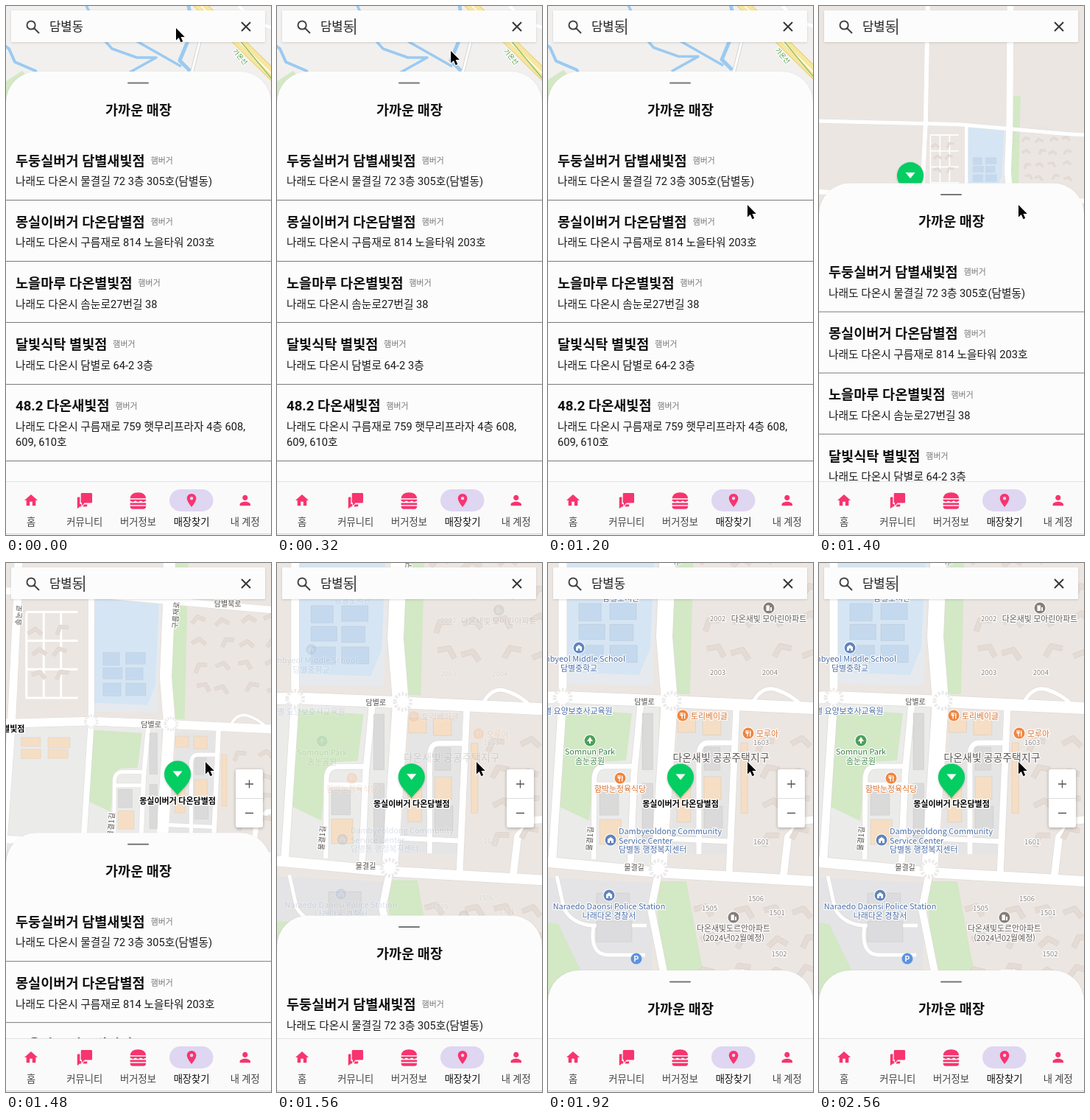
Animation, 360 px wide and 718 px high, one loop 2.6 s. Source, as an HTML page with a canvas:

```html
<!DOCTYPE html>
<html lang="ko">
<head>
<meta charset="utf-8">
<title>매장찾기</title>
<style>
  html, body { margin: 0; width: 100%; height: 100%; overflow: hidden; background: #fafafa; }
  canvas { display: block; width: 360px; height: 718px; }
</style>
</head>
<body>
<canvas id="stage" width="360" height="718"></canvas>
<script>
const LOOP = 2600;
const CENTER = { x: 180, y: 322 };
const PAN = { x: -485, y: 43 };
const ZOOM_STEPS = 3;
const SANS = 'Roboto, "Noto Sans CJK KR", "Noto Sans CJK", sans-serif';
const MAP_SANS = '"Noto Sans CJK KR", "Noto Sans CJK", "Noto Sans", sans-serif';
const PINK = '#f8346f';
const ctx = document.getElementById('stage').getContext('2d');

const clamp = v => Math.min(1, Math.max(0, v));
const mix = (a, b, k) => a + (b - a) * k;
const ease = (t, from, to) => 0.5 - 0.5 * Math.cos(Math.PI * clamp((t - from) / (to - from)));

function seeded(seed) {
  return () => (seed = (seed * 16807) % 2147483647) / 2147483647;
}

function fill(path, color) {
  ctx.fillStyle = color;
  ctx.fill(new Path2D(path));
}

function line(path, color, width) {
  ctx.strokeStyle = color;
  ctx.lineWidth = width;
  ctx.stroke(new Path2D(path));
}

function disc(x, y, r, color) {
  ctx.fillStyle = color;
  ctx.beginPath();
  ctx.arc(x, y, r, 0, 7);
  ctx.fill();
}

function box(x, y, w, h, r, color) {
  ctx.fillStyle = color;
  ctx.beginPath();
  ctx.roundRect(x, y, w, h, r);
  ctx.fill();
}

function at(x, y, draw, angle = 0) {
  ctx.save();
  ctx.translate(x, y);
  ctx.rotate(angle);
  draw();
  ctx.restore();
}

function shadowed(blur, alpha, draw) {
  ctx.save();
  ctx.shadowColor = `rgba(0,0,0,${alpha})`;
  ctx.shadowBlur = blur;
  ctx.shadowOffsetY = 1;
  draw();
  ctx.restore();
}

function text(str, x, y, size, { color = '#111', weight = 400, align = 'left', family = SANS, halo = 0 } = {}) {
  ctx.font = `${weight} ${size}px ${family}`;
  ctx.textAlign = align;
  const base = y + size * 0.35;
  if (halo) {
    ctx.strokeStyle = '#fff';
    ctx.lineWidth = halo;
    ctx.strokeText(str, x, base);
  }
  ctx.fillStyle = color;
  ctx.fillText(str, x, base);
  return ctx.measureText(str).width;
}

const mapText = (str, x, y, size, color, align = 'center') =>
  text(str, x, y, size, { color, align, family: MAP_SANS, halo: 2.5 });

// ---- map ----

function cameraAt(t) {
  const left = 1 - ease(t, 1188, 1580);
  return {
    scale: 2 ** (-ZOOM_STEPS * left),
    x: CENTER.x + PAN.x * left,
    y: CENTER.y + PAN.y * left
  };
}

const project = (cam, x, y) => [
  (x - cam.x) * cam.scale + CENTER.x,
  (y - cam.y) * cam.scale + CENTER.y
];

function drawOverview() {
  fill('M-200-200H600V900H-200Z', '#f1f0ee');
  fill('M-60 110L0 102 22 88 60 130 40 260-60 280Z', '#d5e8c6');
  const water = '#9bcaf1';
  line('M-20 40L4 58 12 76 40 88 58 120', water, 4);
  line('M100-20L128 40 144 58 178 70 204 70 168 90M178 48L238 82', water, 3.5);
  line('M244-20L250 10 246 50 236 74 250 88', water, 5);
  line('M60 200L210 290 400 340M220 100L238 320 220 500M300-20L335 22 400 40', '#fff', 4);
  const railway = 'M270-30L264 45 252 92 246 180';
  line(railway, '#d6d6d6', 5);
  line(railway, '#fff', 3);
  const motorway = 'M250-14L312 44 440 170';
  line(motorway, '#e8cf78', 15);
  line(motorway, '#f8e6a0', 13);
  line(motorway, '#fff', 1.5);
  line('M285 10L322 52 362 100', '#8fc46b', 1.5);
  at(318, 69, () => mapText('가온선', 0, 0, 9, '#4d9a3c'), 0.85);
}

const ROADS = [
  [22, 'M175-1500L164-42 158 100 165 187 150 420'],
  [10, 'M150 420L140 470 160 570 200 2000'],
  [16, 'M-1500 120L-128 186 20 182 168 188 360 197 1500 260'],
  [15, 'M-90-1500L-116-60-128 190-150 500-150 1500'],
  [11, 'M20-60L20 182 6 400'],
  [13, 'M-1500-90L-6-56 355-24 1500 40'],
  [14, 'M-1500 350L0 406 150 420 360 432 1500 480'],
  [9, 'M126 190L117 285 112 410M256 195L246 424'],
  [7, 'M62 402L63 292Q64 276 78 276H118M64 301H114M205 395V260Q206 244 218 244H250M160 374L247 378'],
  [10, 'M319 432L326 372 346 350 400 344'],
  [5, 'M278 190Q290 166 310 172T345 194M12 425L22 470Q34 490 60 492H134M62 492Q56 530 80 532H132']
];

// Splits a block into lots and puts one house on each.
function houses(x, y, w, h, cols, rows, colors, seed) {
  const random = seeded(seed);
  for (let i = 0; i < cols * rows; i++) {
    const lotW = w / cols, lotH = h / rows;
    const houseW = lotW * mix(0.72, 0.9, random());
    const houseH = lotH * mix(0.7, 0.9, random());
    const left = x + (i % cols) * lotW, top = y + Math.floor(i / cols) * lotH;
    box(left, top, houseW, houseH, 1, colors[i % colors.length]);
    line(`M${left} ${top}h${houseW}v${houseH}h${-houseW}z`, 'rgba(120,100,80,.13)', 0.8);
  }
}

// Scatters angled apartment slabs over a loose grid.
function estate(x, y, cols, rows, seed) {
  const random = seeded(seed);
  for (let i = 0; i < cols * rows; i++) {
    const px = x + (i % cols) * 44 + random() * 12;
    const py = y + Math.floor(i / cols) * 42 + random() * 12;
    at(px, py, () => {
      const slab = 'M-13 5L0-5 13 4';
      line(slab, '#dacfc9', 7.6);
      line(slab, '#e4dbd5', 6.2);
    }, (random() - 0.5) * 1.2);
  }
}

function drawStreets() {
  const green = '#d3e8c5', gray = '#e5e5e5', orange = '#f6dec4', slate = '#dadada';
  fill('M-3000-3000H3000V3000H-3000Z', '#ece6e2');
  fill('M-200 190H150V410H-200Z', '#ebebea');
  fill('M164-150H201L193 178H166Z', green);
  fill('M28-45H150L142 166 20 164Z', '#e6eaee');
  fill('M28-45H146L139 115 124 152 22 148Z', '#d5e5f4');
  fill('M22 198L114 204 106 268 72 270 62 290 56 350 14 330Z', green);
  fill('M178 203H248V395H165Z', gray);
  fill('M-200 418L145 434 138 640H-200Z', '#e4e4e6');
  fill('M146 432H188L204 520 230 640H160Z', green);
  fill('M-20 486L14 490 48 560 40 640H-20Z', green);
  for (const [width, path] of ROADS) line(path, '#dedad7', width + 1.4);
  for (const [width, path] of ROADS) line(path, '#fff', width);
  for (let y = -20; y <= 140; y += 53) line(`M-100 ${y}H-5`, '#fff', 4);
  for (let x = -100; x <= -5; x += 32) line(`M${x}-20V140`, '#fff', 4);

  houses(42, 55, 84, 85, 2, 3, ['#c5d9ee'], 5);
  houses(176, 210, 68, 28, 2, 1, [orange], 8);
  houses(175, 282, 26, 82, 1, 1, [orange], 21);
  houses(212, 250, 30, 120, 1, 3, [slate, orange], 3);
  houses(262, 244, 13, 130, 1, 1, [orange], 9);
  houses(128, 204, 20, 190, 1, 2, [slate], 4);
  houses(70, 308, 36, 80, 1, 2, [slate, orange], 6);
  houses(66, 448, 62, 76, 1, 2, ['#dcdcde'], 7);
  houses(-110, 212, 100, 44, 2, 2, [orange], 2);
  estate(218, -12, 4, 4, 11);
  estate(294, 238, 2, 4, 12);
  estate(212, 462, 4, 3, 13);
  estate(-84, 6, 2, 3, 14);

  ctx.setLineDash([3, 2]);
  for (const [x, y] of [[168, 187], [20, 183], [150, 415]]) {
    line(`M${x - 11} ${y}a11 11 0 1 0 22 0a11 11 0 1 0-22 0`, '#ebebeb', 5);
  }
  ctx.setLineDash([]);
}

const ROAD_NAMES = [
  ['담별로', 131, 188], ['물결길', 117, 413], ['담별북로', 273, -35],
  ['물결1길', 57, 374, -1.5], ['구름재로', 177, -14, -1.5], ['솜눈로', -114, -14, -1.5]
];

const KINDS = {
  home: { dot: '#857e7a', ink: '#5d5855', glyph: 'M-3.5 4V-3.5H1V4ZM2 4V-1H4V4Z' },
  civic: { dot: '#6285bb', ink: '#4a6ea6', glyph: 'M-4 4V-1L0-4 4-1V4H1V1H-1V4Z' },
  food: { dot: '#f0853f', ink: '#d9702c', glyph: 'M-3.5-4h1v3h.6v-3h1v3h.6v-3h1v4l-1 1v3.5h-1.2V1l-2-1ZM2-4Q4.5-2 3.3 1V4.5H2Z' },
  park: { dot: '#4da05a', ink: '#3c8047', glyph: 'M0-5L4 1H1V4H-1V1H-4Z' }
};

// Captions stand below the icon, or beside it when marked.
const PLACES = [
  ['home', 300, 61, ['다온새빛 모아린아파트']],
  ['home', 252, 481, ['다온새빛도르안아파트', '(2024년02월예정)']],
  ['civic', 42, 115, ['Dambyeol Middle School', '담별중학교']],
  ['civic', 99, 33, ['담별도서관']],
  ['civic', 83, 451, ['Naraedo Daonsi Police Station', '나래다온 경찰서']],
  ['civic', 85, 376, ['Dambyeoldong Community', 'Service Center', '담별동 행정복지센터'], 'beside'],
  ['civic', -26, 200, ['담별 요양보호사교육원'], 'beside'],
  ['food', 183, 207, ['토리베이글'], 'beside'],
  ['food', 272, 231, ['모루아'], 'beside'],
  ['food', 98, 292, ['함박눈정육식당']],
  ['park', 57, 241, ['Somnun Park', '솜눈공원']]
];

// House numbers run around each estate: centre, radii, first angle and step in degrees.
const ESTATES = [
  { numbers: [2002, 2003, 2004], x: 266, y: 112, rx: 50, ry: 52, from: -135, step: -90 },
  { numbers: [1601, 1602, 1603], x: 278, y: 311, rx: 45, ry: 70, from: 75, step: -75 },
  { numbers: [1501, 1502, 1503, 1505, 1506], x: 262, y: 505, rx: 60, ry: 52, from: -35, step: 65 }
];

function drawPlace(cam, [kind, wx, wy, rows, beside]) {
  const { dot, ink, glyph } = KINDS[kind];
  const [x, y] = project(cam, wx, wy);
  disc(x, y, 8.5, '#fff');
  disc(x, y, 7.5, dot);
  at(x, y, () => fill(glyph, '#fff'));
  rows.forEach((row, i) => {
    if (beside) mapText(row, x + 11, y + 1 + (i - (rows.length - 1) / 2) * 12.5, 10.9, ink, 'left');
    else mapText(row, x, y + 15 + i * 13, 10.9, ink);
  });
}

function drawLabels(cam, t) {
  ctx.globalAlpha = clamp((cam.scale - 0.4) / 0.2);
  for (const [name, wx, wy, angle] of ROAD_NAMES) {
    at(...project(cam, wx, wy), () => mapText(name, 0, 0, 10, '#55504d'), angle);
  }
  ctx.globalAlpha = clamp((t - 1535) / 130);
  for (const { numbers, x, y, rx, ry, from, step } of ESTATES) {
    for (const n of numbers) {
      const angle = (from + step * (n - numbers[0])) * Math.PI / 180;
      mapText(n, ...project(cam, x + rx * Math.cos(angle), y + ry * Math.sin(angle)), 9.5, '#8b8480');
    }
  }
  for (const place of PLACES) drawPlace(cam, place);
  mapText('다온새빛 공공주택지구', ...project(cam, 235, 264), 13.9, '#5b5552');
  const [px, py] = project(cam, 120, 537);
  disc(px, py, 7.5, '#5c93df');
  text('P', px, py, 10.5, { color: '#fff', weight: 700, align: 'center' });
  ctx.globalAlpha = 1;
}

function drawPin(cam, name, wx, wy) {
  at(...project(cam, wx, wy), () => {
    shadowed(3, 0.25, () => fill('M0 0C-3-7-18-15-18-29A18 18 0 0 1 18-29C18-15 3-7 0 0Z', '#04cd62'));
    fill('M-6.5-33H6.5L0-25Z', '#fff');
    text(name, 0, 8, 11, { color: '#000', weight: 700, align: 'center', family: MAP_SANS, halo: 3 });
  });
}

function drawMap(t) {
  const cam = cameraAt(t);
  const ratio = 2 ** ZOOM_STEPS;
  ctx.save();
  ctx.translate(...project(cam, CENTER.x * (1 - ratio) + PAN.x, CENTER.y * (1 - ratio) + PAN.y));
  ctx.scale(cam.scale * ratio, cam.scale * ratio);
  drawOverview();
  ctx.restore();

  const detail = clamp((cam.scale - 0.2) / 0.2);
  if (detail > 0) {
    ctx.save();
    ctx.globalAlpha = detail;
    ctx.translate(...project(cam, 0, 0));
    ctx.scale(cam.scale, cam.scale);
    drawStreets();
    ctx.restore();
    drawLabels(cam, t);
  }
  drawPin(cam, '노을마루 다온별빛점', -167, 186);
  drawPin(cam, '몽실이버거 다온담별점', 180, 319.5);
}

// ---- interface ----

function drawZoomButtons() {
  shadowed(4, 0.3, () => box(312, 280, 37, 79, 3, '#fff'));
  line('M312 319.5H349', '#ddd', 1);
  line('M325 300H336M330.5 294.5V305.5M325 339.5H336', '#555', 1.3);
}

const STORES = [
  ['두둥실버거 담별새빛점', '나래도 다온시 물결길 72 3층 305호(담별동)'],
  ['몽실이버거 다온담별점', '나래도 다온시 구름재로 814 노을타워 203호'],
  ['노을마루 다온별빛점', '나래도 다온시 솜눈로27번길 38'],
  ['달빛식탁 별빛점', '나래도 다온시 담별로 64-2 3층'],
  ['48.2 다온새빛점', '나래도 다온시 구름재로 759 햇무리프라자 4층 608,', '609, 610호']
];

function drawSheet(t) {
  at(0, mix(89, 553, ease(t, 1224, 1681)), () => {
    shadowed(3, 0.12, () => box(0, 0, 360, 700, [42, 42, 0, 0], '#fcfcfc'));
    box(165, 14.5, 29, 2, 1, '#777');
    text('가까운 매장', 180, 52, 18.6, { weight: 700, align: 'center' });
    STORES.forEach(([name, ...address], i) => {
      const y = 121 + i * 83.2;
      const width = text(name, 13, y, 18.6, { weight: 700 });
      text('햄버거', 13 + width + 8, y, 10.9, { color: '#777' });
      address.forEach((row, j) => text(row, 13, y + 28 + j * 21.5, 14.7, { color: '#1a1a1a' }));
      const rule = Math.round(y + 53 + (address.length - 1) * 21) + 0.5;
      line(`M0 ${rule}H360`, '#7a7a7a', 1);
    });
  });
}

function drawSearch(t) {
  shadowed(3, 0.14, () => box(7, 6, 345, 43, 1, '#fcfcfc'));
  line('M28.5 26a5.6 5.6 0 1 0 11.2 0a5.6 5.6 0 1 0-11.2 0M38 30L45 37', '#444', 2);
  line('M320 22L332 34M332 22L320 34', '#333', 1.9);
  text('담별동', 59, 28, 16.7, { color: '#222' });
  const blink = (t + 820) % 1000;
  if (blink < 500) box(105.3, 17, 1.5, 22, 0, '#222');
}

const TABS = [
  ['홈', 'M10 20v-6h4v6h5v-8h3L12 3 2 12h3v8z'],
  ['커뮤니티', 'M8 1H22Q23.5 1 23.5 2.5V14.5Q23.5 16 22 16H12L8 20V16Q6.5 16 6.5 14.5V2.5Q6.5 1 8 1ZM5 7V17.5H7V21.5H5L1 24.5V8.5Q1 7 2.5 7ZM11 18H16V20Q16 21.5 14.5 21.5H9.5Z'],
  ['버거정보', 'M0 9Q1 0 12 0T24 9ZM0 10.5H24V12.5L20 14.5 16 12.5 12 14.5 8 12.5 4 14.5 0 12.5ZM0 16H24V19H0ZM0 20.5H24Q24 25 20 25H4Q0 25 0 20.5Z'],
  ['매장찾기', 'M12 2C8.13 2 5 5.13 5 9c0 5.25 7 13 7 13s7-7.75 7-13c0-3.87-3.13-7-7-7zm0 9.5a2.5 2.5 0 0 1 0-5 2.5 2.5 0 0 1 0 5z'],
  ['내 계정', 'M12 12c2.21 0 4-1.79 4-4s-1.79-4-4-4-4 1.79-4 4 1.79 4 4 4zm0 2c-2.67 0-8 1.34-8 4v2h16v-2c0-2.66-5.33-4-8-4z']
];
const ACTIVE_TAB = 3;

function drawTabs() {
  box(0, 645, 360, 73, 0, '#fafafa');
  line('M0 645.5H360', '#e2e2e2', 1);
  line('M0 716.5H360', '#cfcfcf', 1);
  box(222, 656, 59.5, 30, 15, '#dfd6f1');
  TABS.forEach(([label, icon], i) => {
    const x = 34 + i * 72.7;
    const active = i === ACTIVE_TAB;
    at(x - 10.8, 660.2, () => {
      ctx.scale(0.9, 0.9);
      fill(icon, PINK);
    });
    text(label, x, 700, 13.3, { color: active ? '#111' : '#444', weight: active ? 500 : 400, align: 'center' });
  });
}

function drawCursor(t) {
  const k = ease(t, 150, 880);
  const arrow = 'M0 0V16.5L3.8 13 6.5 19.2 9.2 18 6.5 12H11.8Z';
  at(mix(231, 271, k), mix(30, 270, k), () => {
    line(arrow, '#fff', 2);
    fill(arrow, '#000');
  });
}

function render(t) {
  ctx.lineJoin = 'round';
  drawMap(t);
  drawZoomButtons();
  drawSheet(t);
  drawSearch(t);
  drawTabs();
  drawCursor(t);
}

const start = performance.now();
function tick() {
  render((performance.now() - start) % LOOP);
  requestAnimationFrame(tick);
}
tick();
</script>
</body>
</html>
```
